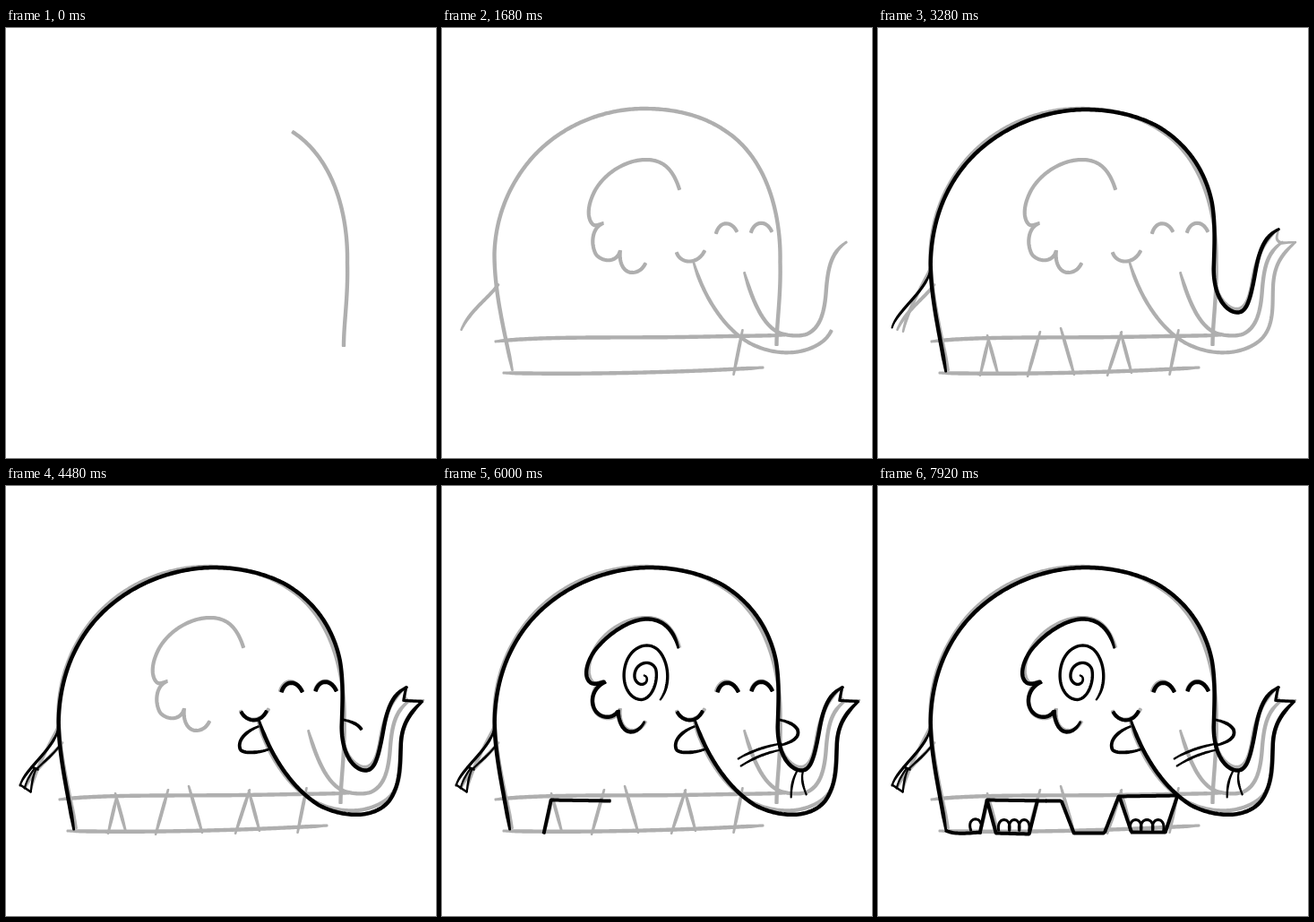
Animation, 480 px wide and 480 px high, one loop 8 s. Source, as an HTML page:

```html
<!DOCTYPE html>
<html lang="en">
<head>
<meta charset="utf-8">
<title>Drawing an elephant</title>
<style>
  html, body { margin: 0; width: 100%; height: 100%; overflow: hidden; background: #fff; }
  svg { display: block; width: 100%; height: 100%; }
  path { stroke-width: 2; stroke-linejoin: round; }
  .sketch { fill: #afafaf; stroke: #afafaf; }
  .ink { fill: #000; stroke: #000; }
</style>
</head>
<body>
<svg viewBox="0 0 480 480">
  <g id="base" class="sketch"></g>
  <g id="detail" class="sketch"></g>
  <g id="ink" class="ink" transform="translate(0.7 0.5)"></g>
</svg>
<script>
const STEP = 80, LOOP = 8000;
const BLUNT = 0, BOTH = 1, END = 2, START = 3;
const SVG = 'http://www.w3.org/2000/svg';
const strokes = [];
let cursor = 0;

// Queue a stroke that takes `frames` steps, right after the previous one.
function add(group, frames, width, taper, d) {
  const el = document.createElementNS(SVG, 'path');
  el.setAttribute('d', d);
  strokes.push({ el, start: cursor, frames, edge: outline(el, width, taper), shown: 0 });
  el.setAttribute('d', '');
  document.getElementById(group).append(el);
  cursor += frames;
}

// Left and right edge points of a pen line, thinner at tapered ends.
function outline(path, width, taper) {
  const len = path.getTotalLength(), n = Math.ceil(len / 2), edge = [];
  for (let i = 0; i <= n; i++) {
    const s = len * i / n;
    const p = path.getPointAtLength(s);
    const a = path.getPointAtLength(Math.max(0, s - 1));
    const b = path.getPointAtLength(Math.min(len, s + 1));
    const dx = b.x - a.x, dy = b.y - a.y, size = Math.hypot(dx, dy) || 1;
    const head = taper === BOTH || taper === START ? s : len;
    const tail = taper === BOTH || taper === END ? len - s : len;
    const thin = taper === BLUNT ? 1 : Math.min(1, 0.65 + 0.35 * Math.min(head, tail) / 16);
    const h = Math.max(0.1, (width * thin - 2) / 2);
    const ox = -dy / size * h, oy = dx / size * h;
    edge.push([[p.x + ox, p.y + oy], [p.x - ox, p.y - oy]]);
  }
  return edge;
}

const fmt = p => p[0].toFixed(2) + ',' + p[1].toFixed(2);

function ribbon(edge, part) {
  if (part <= 0) return '';
  const cut = edge.slice(0, Math.max(2, Math.round(part * (edge.length - 1)) + 1));
  const left = cut.map(e => fmt(e[0]));
  const right = cut.map(e => fmt(e[1])).reverse();
  return 'M' + left.concat(right).join('L') + 'Z';
}

const toe = (x, y, w) => `M${x},${y} C${x - 3},${y - 16} ${x + w + 3},${y - 16} ${x + w},${y}`;

// Rough shape
const base = (...a) => add('base', ...a);
base(1, 4.4, BLUNT, 'M377,355 C377,330 382,300 381,262 C382,208 366,146 320,116');
base(4, 4.4, END, 'M320,116 C294,98 262,91 229,91 C185,91 137,109 104,146 C76,178 63,216 62,253 C62,295 72,335 82,383');
base(2, 4.4, BOTH, 'M63,351 C110,345 200,347 270,346 L386,344');
base(1, 4.4, BOTH, 'M72,386 C150,388 260,386 362,380');
base(1, 4, END, 'M66,287 C60,299 35,315 25,338');
base(1, 4, BOTH, 'M339,338 L329,388');
base(4, 4.4, BOTH, 'M341,274 C350,305 362,335 382,342 C393,345 402,345 410,343 C425,337 430,320 432,298 C434,270 437,252 455,240');

// Sketched details
const shiftAt = cursor;
const detail = (...a) => add('detail', ...a);
detail(1, 4.2, BLUNT, 'M306,229 C310,215 323,215 329,227');
detail(1, 4.2, BLUNT, 'M345,228 C349,215 362,214 368,227');
detail(3, 4.2, BLUNT, 'M265,180 C258,158 247,147 228,147 C205,147 182,162 171,181 C163,196 161,211 168,219 C171,222 176,219 180,218 C168,222 165,240 172,253 C180,262 196,262 199,248 C197,262 203,273 212,273 C219,273 224,269 227,263');
detail(1, 4.2, BLUNT, 'M262,251 C266,263 285,265 293,249');
detail(3, 4.2, BOTH, 'M281,262 C292,300 316,338 346,353 C372,366 405,366 426,349 C443,334 440,310 441,289 C442,265 450,253 466,239');
detail(2, 4.2, BOTH, 'M378,288 C380,302 390,313 400,314 C411,314 415,300 418,282 C422,257 430,238 447,224');
detail(1, 3.4, BOTH, 'M447,224 C446,232 442,236 450,240 L466,239');
detail(1, 3.8, BOTH, 'M58,268 C52,285 34,310 28,339');
for (const leg of ['M124,345 L114,388', 'M122,343 L134,387', 'M181,339 L167,389',
                   'M204,335 L219,387', 'M272,339 L256,388', 'M271,340 L283,385'])
  detail(5 / 6, 4, BOTH, leg);

// Ink: body and tail
cursor = 34;
const ink = (...a) => add('ink', ...a);
ink(7, 4.5, BOTH, 'M447,224 C429,232 424,252 420,275 C415,302 411,317 401,317 C388,317 374,300 374,268 C375,240 376,217 372,194 C364,156 342,127 311,109 C286,96 259,90.5 229,90.5 C181,91.5 133,112 101,147 C74,177 59,216 58,262 C58,300 68,340 75,383');
ink(1, 3.2, BOTH, 'M58,268 C55,292 20,315 15,334');
ink(0.5, 2.6, BLUNT, 'M15,333 L27,341');
ink(1, 2.8, BOTH, 'M33,315 C29,324 28,332 27,341');
ink(1, 2.6, BOTH, 'M31,315 C26,322 22,329 20,337');
ink(0.5, 2.6, BLUNT, 'M28,313 L35,316');
ink(1, 2.8, BOTH, 'M58,291 C50,301 42,307 34,315');

// Ink: face and trunk
ink(1, 4.6, BLUNT, 'M307,229 C311,216 324,216 330,229');
ink(1, 4.6, BLUNT, 'M345,228 C349,215 362,215 368,228');
ink(1, 4.2, BLUNT, 'M262,252 C268,263 283,265 290,251');
ink(3, 4.5, BOTH, 'M282,262 C294,299 318,337 349,356 C378,371 412,370 427,351 C440,333 439,310 440,291 C440,267 450,253 464,240');
ink(1, 3.2, BLUNT, 'M446,224 L443,239 L464,240');
ink(3, 3.8, BOTH, 'M281,268 C265,274 257,285 261,294 C266,299 283,297 294,293');
ink(1, 3.8, START, 'M374,260 C384,262 392,265 396,271');
ink(1, 3.8, END, 'M396,271 C400,281 388,286 377,289');
ink(1, 3, BOTH, 'M330,304 C343,296 360,290 378,287');
ink(1, 3, BOTH, 'M333,312 C347,303 362,297 378,294');
ink(1, 3, BOTH, 'M396,317 C391,326 389,335 389,347');
ink(1, 3, BOTH, 'M402,319 C400,328 403,336 406,344');

// Ink: ear
ink(5, 3.4, BOTH, 'M225,211 C230,212 229,221 222,221 C215,220 212,212 216,204 C221,195 234,194 238,204 C241,217 234,237 222,238 C209,238 200,222 203,204 C207,179 229,171 241,183 C253,196 255,222 243,238');
ink(7, 4.4, BOTH, 'M263,180 C258,160 246,148 228,148 C208,148 183,166 170,183 C160,197 157,213 165,219 C169,222 176,219 182,218 C168,224 163,240 171,251 C178,260 192,259 196,250 C196,263 202,274 210,274 C217,274 222,269 225,263');

// Ink: legs
ink(1, 4, BLUNT, 'M113,387 L121,350');
ink(1, 4, BLUNT, 'M121,350 L187,351');
ink(1, 4, BLUNT, 'M187,351 L204,351 L218,387');
ink(1, 4, BLUNT, 'M218,387 L252,387 L268,346');
ink(2, 4, BLUNT, 'M121,350 L131,387');
ink(2, 4, BLUNT, 'M131,387 L168,388');
ink(2, 4, BLUNT, 'M168,388 L177,352');
ink(1, 4, BLUNT, 'M268,346 L334,345');
ink(1, 4, BLUNT, 'M269,347 L282,385');
ink(1, 4, BLUNT, 'M282,386 L320,386');
ink(2, 4, BLUNT, 'M320,386 L333,347');

// Ink: foot and toes
ink(2, 4, BLUNT, 'M75,384 C85,389 100,387 114,386');
for (const d of ['M103,384 C98,370 112,368 114,376',
                 toe(134, 384, 12), toe(146, 384, 11), toe(157, 384, 11),
                 toe(281, 384, 12), toe(293, 384, 13), toe(306, 384, 12)])
  ink(9 / 7, 3, BLUNT, d);

function draw(frame) {
  document.getElementById('base').setAttribute('transform',
    frame < shiftAt ? '' : 'translate(-3.5 -1)');
  for (const s of strokes) {
    const part = Math.max(0, Math.min(1, (frame + 1 - s.start) / s.frames));
    if (part === s.shown) continue;
    s.shown = part;
    s.el.setAttribute('d', ribbon(s.edge, part));
  }
}

let last = -1;
const origin = performance.now();
function tick() {
  const frame = Math.floor((performance.now() - origin) % LOOP / STEP);
  if (frame !== last) draw(last = frame);
  requestAnimationFrame(tick);
}
tick();
</script>
</body>
</html>
```
